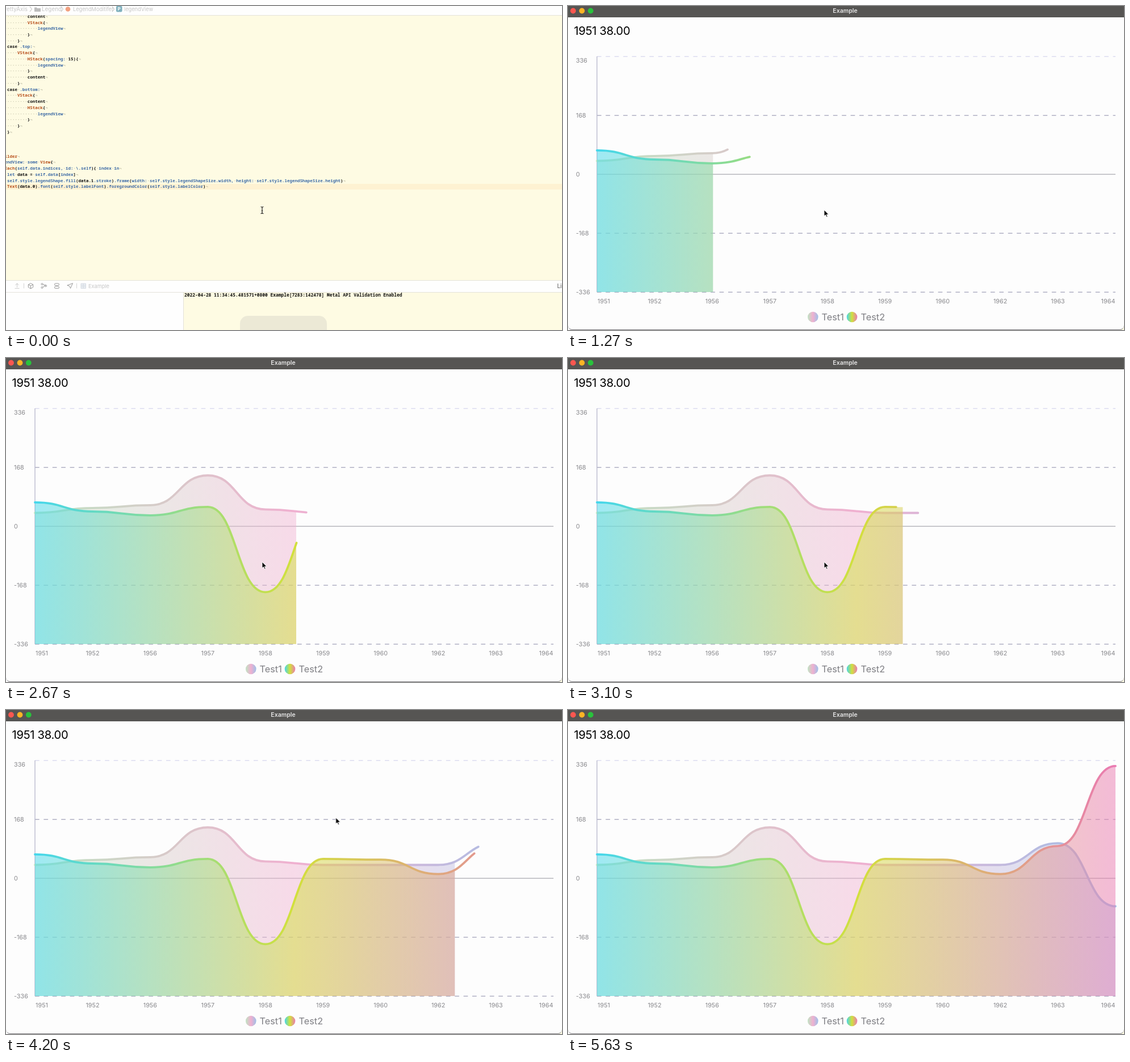
An HTML page that plays this animation: 979x572 px, repeating every 5.66 s.

```html
<!DOCTYPE html>
<html lang="en">
<head>
<meta charset="utf-8">
<title>Area chart</title>
<style>
html, body { margin: 0; width: 100%; height: 100%; overflow: hidden; background: #fefbe3; }
#stage { position: relative; width: 979px; height: 572px; overflow: hidden; }
#stage > *, #ide > * { position: absolute; }
#ide, #win, #win svg { left: 0; top: 0; width: 979px; height: 572px; }
svg { display: block; font-family: Inter, "Open Sans", sans-serif; }

/* editor */
#ide { background: #fefbe3; }
pre { margin: 0; white-space: pre; font-family: "Noto Sans Mono", "DejaVu Sans Mono", monospace; font-weight: 700; color: #111; }
#code { left: -33.9px; top: 12.8px; font-size: 7.475px; line-height: 10.74px; }
#log { left: 314px; top: 504.5px; font-size: 7.9px; line-height: 11px; }
#code .type { color: #b8501c; }
#code .name { color: #3f6ca6; }
#code .dim { color: #c3c1a8; }
#row { left: 0; top: 313.5px; width: 979px; height: 10.7px; background: #fef2d2; }

/* chart window */
#win { animation: open 5660ms infinite; }
#frame { position: absolute; inset: 0; box-sizing: border-box; background: #fdfdfd; border-bottom: 1px solid #77767a; border-radius: 0 0 8px 8px; overflow: hidden; }
.axis { font-size: 10.8px; fill: #88888c; }
.legend { font-size: 16.3px; fill: #7f7f84; }
.grid { stroke: #b0b0c4; stroke-width: 1.5; stroke-dasharray: 7.7 7.7; }
.line { fill: none; stroke-width: 3.8; stroke-linecap: round; stroke-dasharray: 1 2; animation: draw 5660ms linear infinite; }
#reveal { transform-origin: 51px 0; animation: reveal 5660ms linear infinite; }
#hud { left: 412px; top: 547px; width: 153px; height: 60px; border-radius: 14px; background: rgba(211, 209, 198, .83); animation: hud 5660ms linear infinite; }
#arrow { left: 0; top: 0; animation: move 5660ms linear infinite; }

@keyframes open {
  0%, 1.9% { opacity: 0; transform: scale(.86); animation-timing-function: ease-out; }
  5.3%, 100% { opacity: 1; transform: none; }
}
@keyframes draw {
  0%, 2.35% { stroke-dashoffset: 1; }
  90.8%, 100% { stroke-dashoffset: 0; }
}
@keyframes reveal {
  0%, 2.69% { transform: scaleX(0); }
  91.03%, 100% { transform: scaleX(1); }
}
@keyframes hud {
  0% { opacity: .5; }
  2%, 17.5% { opacity: 1; }
  20.3%, 100% { opacity: 0; }
}
@keyframes move {
  0% { opacity: 0; transform: translate(451px, 360px); animation-timing-function: step-end; }
  2.65% { opacity: 1; transform: translate(451px, 360px); }
  60.5% { transform: translate(451px, 360px); }
  62.4% { transform: translate(450px, 358px); animation-timing-function: cubic-bezier(.5, 0, .6, 1); }
  85.3% { opacity: 1; transform: translate(733px, -6px); }
  87%, 100% { opacity: 1; transform: translate(740px, -24px); }
}
</style>
</head>
<body>
<div id="stage">
  <div id="ide">
    <div id="row"></div>
    <pre id="code"></pre>
    <svg width="979" height="572" fill="none">
      <path d="M0 0H979V16H0ZM0 484H979V505H0ZM0 505H312V572H0Z" fill="#fefefe"/>
      <path d="M0 16.5H979M0 484.5H979M0 505.5H979M312.5 505V572" stroke="#e4e2da"/>
      <g font-size="9.9" fill="#c6c6c6">
        <text x="38" y="9" text-anchor="end">PrettyAxis</text>
        <text x="63" y="9">Legend</text>
        <text x="118" y="9" font-size="9.2">LegendModitifer</text>
        <text x="208" y="9" font-size="9.2">legendView</text>
        <text x="145" y="497.5" font-size="9.2">Example</text>
        <text x="970.5" y="497.5" fill="#555">Line: 158</text>
      </g>
      <path d="M42 1L45.5 5.5 42 10M97 1L100.5 5.5 97 10M187 1L190.5 5.5 187 10" stroke="#b2b2b2"/>
      <path d="M50 2.5h4l1 1.5h6v6H50z" fill="#bdbdbd"/>
      <circle cx="109" cy="5.5" r="4.3" fill="#f2a080"/>
      <rect x="194" y="0" width="10.5" height="10.5" rx="2" fill="#7fb0bd"/>
      <text x="199.2" y="8.3" font-size="8" font-weight="700" text-anchor="middle" fill="#fff">P</text>
      <path d="M31.5 489.5v9M124.5 489.5v9" stroke="#d4d4d4"/>
      <path d="M19.5 497v-7m-3 3l3-3.5 3 3.5M15.500 498.500h8" stroke="#cecece"/>
      <g stroke="#989898">
        <path d="M43.5 489.5l4.2 2.3v4.8l-4.2 2.3-4.2-2.3v-4.8zM39.3 491.8l4.2 2.2 4.2-2.2M43.5 494v5"/>
        <path d="M64.5 491.5l5 1.5M64.5 496.5l5-3"/>
        <circle cx="63.5" cy="491" r="1.5"/><circle cx="63.5" cy="497" r="1.5"/><circle cx="70" cy="494" r="1.5"/>
        <rect x="85.5" y="489.8" width="8" height="3.6" rx="1.8"/><rect x="85.5" y="495" width="8" height="3.6" rx="1.8"/>
        <path d="M117.5 489.5l-4 9-1.7-4-4-1.3z"/>
      </g>
      <path d="M132 490h8.5v8.5H132zM132 494.2h8.5M136.2 490v8.5" stroke="#d6dbe2" fill="#e8ecf1"/>
      <path d="M448.500 354.500q2.500 0 2.500 1.500v9q0 1.500-2.500 1.500M453.500 354.500q-2.500 0-2.500 1.500v9q0 1.500 2.500 1.500M449.800 361.500h2.400" stroke="#222" stroke-width="1.2"/>
    </svg>
    <pre id="log">2022-04-28 11:34:45.481571+0800 Example[7283:142478] Metal API Validation Enabled</pre>
  </div>

  <div id="win">
    <div id="frame">
      <svg viewBox="0 0 979 572">
        <defs>
          <linearGradient id="g0" gradientUnits="userSpaceOnUse" x1="51" x2="964" y1="0" y2="0">
            <stop stop-color="#bfe4c2"/><stop offset=".5" stop-color="#f0b0d0"/><stop offset="1" stop-color="#9fc0e8"/>
          </linearGradient>
          <linearGradient id="g1" gradientUnits="userSpaceOnUse" x1="51" x2="964" y1="0" y2="0">
            <stop stop-color="#44d7ec"/><stop offset=".5" stop-color="#d2e03c"/><stop offset="1" stop-color="#ea7bb2"/>
          </linearGradient>
          <linearGradient id="k0" href="#g0" gradientUnits="objectBoundingBox" x1="0" x2="1"/>
          <linearGradient id="k1" href="#g1" gradientUnits="objectBoundingBox" x1="0" x2="1"/>
          <clipPath id="shown"><rect id="reveal" x="51" y="80" width="913" height="425"/></clipPath>
        </defs>
        <rect width="979" height="20" fill="#565553"/>
        <circle cx="9" cy="8.5" r="4.9" fill="#fc5750"/>
        <circle cx="24.5" cy="8.5" r="4.9" fill="#fdb424"/>
        <circle cx="39.8" cy="8.5" r="4.9" fill="#29c23c"/>
        <text x="488" y="11.7" font-size="10.5" font-weight="600" text-anchor="middle" fill="#e6e6e6">Example</text>
        <text x="10.5" y="51" font-size="20.2" letter-spacing="-.3" fill="#000">1951 38.00</text>
        <g id="axes"></g>
        <path d="M51 89V505" stroke="#b6b6cc" stroke-width="1.3"/>
        <g id="plot"></g>
        <circle cx="431.3" cy="549" r="9.3" fill="url(#k0)"/>
        <circle cx="500" cy="549" r="9.3" fill="url(#k1)"/>
        <text class="legend" x="446.5" y="555">Test1</text>
        <text class="legend" x="515.5" y="555">Test2</text>
      </svg>
    </div>
  </div>
  <div id="hud"></div>
  <svg id="arrow" width="12" height="16" overflow="visible">
    <path d="M0 0V11L2.6 8.7 4.3 12.6 6.1 11.9 4.4 8.1H7.9Z" fill="#000" stroke="#fff" stroke-width=".9"/>
  </svg>
</div>

<script>
const $ = id => document.getElementById(id);

// Editor text: "depth|line", where depth counts four-column indents
const source = String.raw`4|content
4|VStack{
5|legendView
4|}
3|}
2|case .top:
3|VStack{
4|HStack(spacing: 15){
5|legendView
4|}
4|content
3|}
2|case .bottom:
3|VStack{
4|content
4|HStack{
5|legendView
4|}
3|}
2|}



0|@ViewBuilder
0|var legendView: some View{
1|ForEach(self.data.indices, id: \.self){ index in
2|let data = self.data[index]
2|self.style.legendShape.fill(data.1.stroke).frame(width: self.style.legendShapeSize.width, height: self.style.legendShapeSize.height)
2|Text(data.0).font(self.style.labelFont).foregroundColor(self.style.labelColor)`;

const span = (kind, text) => `<span class="${kind}">${text}</span>`;
const token = /(@ViewBuilder|\b(?:VStack|HStack|ForEach|Text|View)\b)|((?<!\.)\b(?:content|case|data)\b)|([.\\]*[A-Za-z]\w*[:.,]?)|( )/g;
const paint = text => text.replace(token, (all, type, plain, name) =>
  type ? span('type', all) : plain ? all : name ? span('name', all) : span('dim', '·'));

$('code').innerHTML = source.split('\n').map(line => {
  if (!line) return '';
  const [depth, text] = line.split('|');
  return span('dim', '·'.repeat(depth * 4)) + paint(text) + span('dim', '¬');
}).join('\n');

// Chart
const px = i => 51 + i * 913 / 9;
const py = v => 297 - v * 208 / 336;
const series = [
  [38, 52, 60, 145, 48, 38, 38, 38, 100, -80],
  [68, 42, 31, 55, -188, 55, 53, 12, 92, 320]
];
const years = [1951, 1952, 1956, 1957, 1958, 1959, 1960, 1962, 1963, 1964];

const curve = values => values.map((v, i) => {
  if (!i) return `M${px(0)} ${py(v)}`;
  const mid = px(i - .5);
  return `C${mid} ${py(values[i - 1])} ${mid} ${py(v)} ${px(i)} ${py(v)}`;
}).join('');

$('axes').innerHTML = [336, 168, 0, -168, -336].map(v => {
  const look = v ? `class="grid"${v === 336 ? ' style="stroke:#dcdcf0"' : ''}` : 'stroke="#a9a9b0" stroke-width="1.3"';
  return `<path d="M51 ${py(v) + .2}H964" ${look}/>
    <text class="axis" x="14" y="${v === 336 ? 100 : py(v) + 4}">${v}</text>`;
}).join('') + years.map((year, i) => {
  const x = i === 0 ? 63 : i === 9 ? 951 : px(i);
  return `<text class="axis" x="${x}" y="525" text-anchor="middle">${year}</text>`;
}).join('');

$('plot').innerHTML = series.map((values, i) => {
  const d = curve(values), paintRef = `url(#g${i})`;
  return `<path d="${d}V505H51Z" fill="${paintRef}" fill-opacity="${i ? .51 : .45}" clip-path="url(#shown)"/>
    <path class="line" d="${d}" stroke="${paintRef}" pathLength="1"/>`;
}).join('');
</script>
</body>
</html>
```
